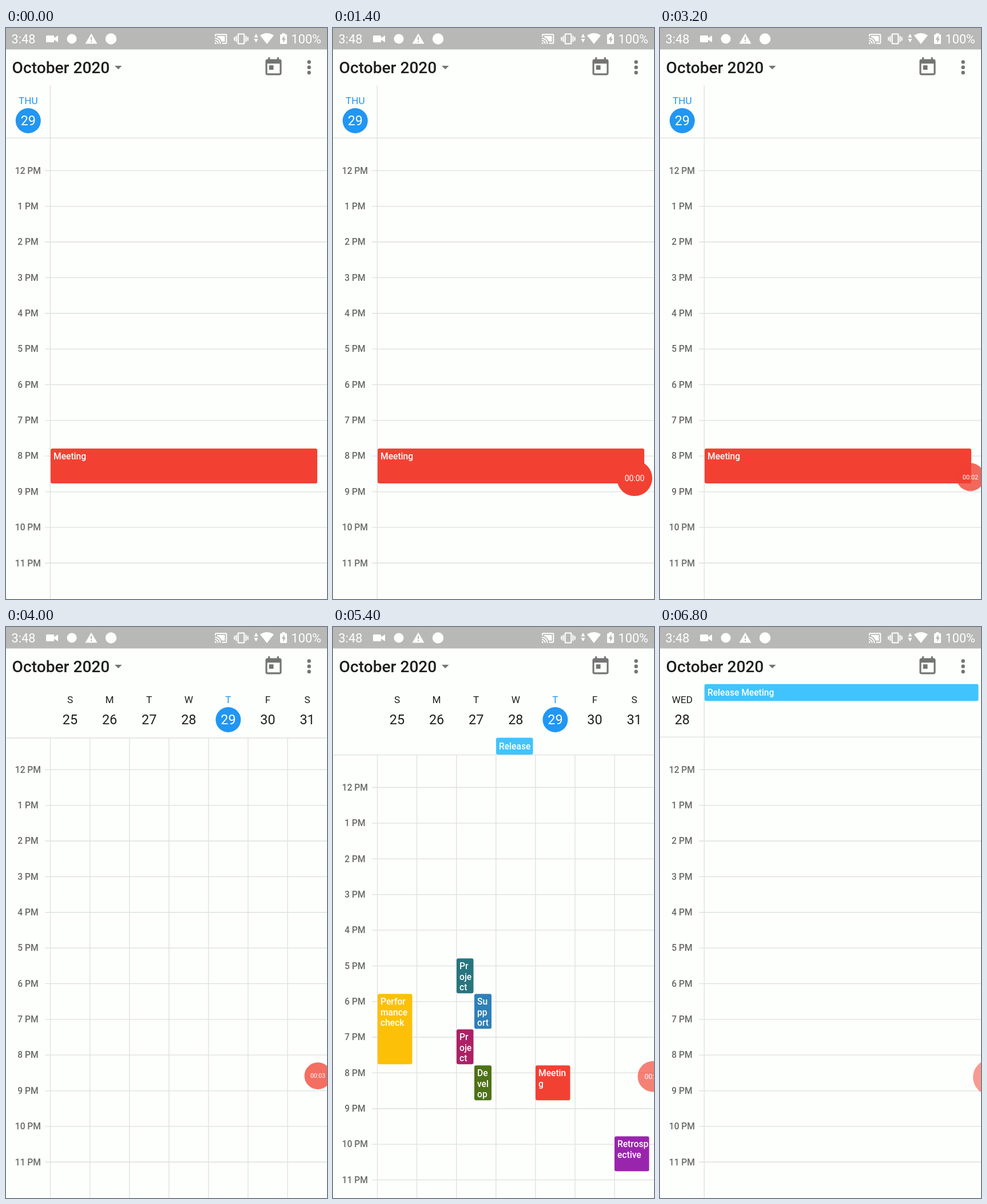
An HTML page that plays this animation: 561x998 px, repeating every 8 s.

```html
<!DOCTYPE html>
<html lang="en">
<head>
<meta charset="utf-8">
<title>Calendar views</title>
<style>
  html, body { margin: 0; width: 100%; height: 100%; overflow: hidden; background: #fdfffc; }
  svg { display: block; width: 100%; height: 100%; font-family: Roboto, Arial, sans-serif; }
  .mid { text-anchor: middle; }
  .hour { font-size: 15.6px; font-weight: 500; fill: #686968; }
  .event { font-size: 15.6px; font-weight: 500; fill: #fff; }
  .name { font-size: 17.2px; }
  .date { font-size: 23.4px; }
  .line { stroke: #dfe0de; stroke-width: 1.3; }
</style>
</head>
<body>
<svg viewBox="0 0 561 998" preserveAspectRatio="none">
  <rect width="561" height="998" fill="#fdfffc"/>

  <g fill="#fff">
    <rect width="561" height="37.5" fill="#b8b9b7"/>
    <g font-size="21.7">
      <text x="9.5" y="27">3:48</text>
      <text x="498.5" y="27">100%</text>
    </g>
    <path id="camera" d="M71.5 13h11q1.5 0 1.5 1.5v3l7-4.5v12l-7-4.5v3q0 1.5-1.5 1.5h-11q-1.5 0-1.5-1.5v-9q0-1.5 1.5-1.5z"/>
    <g id="notices">
      <circle cx="115" cy="19" r="8.5"/>
      <path d="M149 9.5L159.5 27.5H138.5Z"/>
      <path d="M148 15.5h2v5.5h-2zM148 22.8h2v2.2h-2z" fill="#b8b9b7"/>
      <circle cx="183.5" cy="19" r="9.7"/>
    </g>
    <path transform="translate(364 7.3) scale(.97)" d="M1 18v3h3c0-1.66-1.34-3-3-3zm0-4v2c2.76 0 5 2.24 5 5h2c0-3.87-3.13-7-7-7zm18-7H5v1.63c3.96 1.28 7.09 4.41 8.37 8.37H19V7zM1 10v2c4.97 0 9 4.03 9 9h2c0-6.08-4.93-11-11-11zm20-7H3c-1.1 0-2 .9-2 2v3h2V5h18v14h-7v2h7c1.1 0 2-.9 2-2V5c0-1.1-.9-2-2-2z"/>
    <path transform="translate(398.3 6.3) scale(1.06)" d="M0 15h2V9H0v6zm3 2h2V7H3v10zm19-8v6h2V9h-2zm-3 8h2V7h-2v10zM16.5 3h-9C6.67 3 6 3.67 6 4.5v15c0 .83.67 1.5 1.5 1.5h9c.83 0 1.5-.67 1.5-1.5v-15c0-.83-.67-1.5-1.5-1.5zM16 19H8V5h8v14z"/>
    <path d="M437 10l3.5 6.5h-7zM437 25.5l3.5-6.5h-7z"/>
    <path d="M456 28L444 13Q456 5 468 13Z"/>
    <path d="M482.5 11v-2h5v2h2q1.5 0 1.5 1.5v14q0 1.5-1.5 1.5h-9q-1.5 0-1.5-1.5v-14q0-1.5 1.5-1.5z"/>
    <path d="M486.5 13l-5 7.5h3v5.5l4.5-7.5h-2.5z" fill="#b8b9b7"/>
  </g>

  <text x="10.6" y="79" font-size="28.1" font-weight="500" fill="#1d1e1d">October 2020</text>
  <g fill="#737473">
    <path d="M190 66h12.5l-6.25 6.3z"/>
    <path transform="translate(448.8 49.7) scale(1.56)" d="M19 3h-1V1h-2v2H8V1H6v2H5c-1.11 0-1.99.9-1.99 2L3 19c0 1.1.89 2 2 2h14c1.1 0 2-.9 2-2V5c0-1.1-.9-2-2-2zm0 16H5V8h14v11zM7 10h5v5H7z"/>
    <circle cx="529.7" cy="59.4" r="3.2"/>
    <circle cx="529.7" cy="68.7" r="3.2"/>
    <circle cx="529.7" cy="78" r="3.2"/>
  </g>

  <g id="hours"></g>
  <g id="today"></g>
  <g id="week"></g>
  <g id="weekEvents"></g>
  <g id="yesterday"></g>
  <g id="yesterdayEvents"></g>

  <g id="bubble">
    <circle id="disc" r="31" fill="#f24133"/>
    <text id="timer" class="mid" y="4.9" font-size="13.9" fill="#fff"></text>
  </g>
</svg>
<script>
const LOOP = 8000;
const WEEK_AT = 4000, WEEK_LOADED = 4100, DAY_AT = 6100, DAY_LOADED = 6200;
const RECORD_AT = 900;
const BLUE = '#2196f3', INK = '#1f201f', RED = '#f24133', SKY = '#41c4fe';
const COL = 69.1, HOUR = 62.36, NOON = 249.3, SHIFT = 31.2;

const $ = id => document.getElementById(id);
const clamp = v => Math.min(1, Math.max(0, v));
const ramp = (t, from, to) => clamp((t - from) / (to - from));
const ease = p => p * p * (3 - 2 * p);
const mix = (a, b, p) => a + (b - a) * p;
const show = (id, on) => $(id).setAttribute('display', on ? 'inline' : 'none');

const line = (x1, y1, x2, y2) =>
  `<line class="line" x1="${x1}" y1="${y1}" x2="${x2}" y2="${y2}"/>`;
const label = (cls, x, y, text, fill) =>
  `<text class="${cls}" x="${x}" y="${y}"${fill ? ` fill="${fill}"` : ''}>${text}</text>`;

// Events start a little above their hour line; "|" breaks the title.
function event(x, w, hour, hours, color, text) {
  const y = Math.round(NOON + hour * HOUR - 13.5);
  const h = Math.round(hours * HOUR - 1.5);
  const rows = text.split('|').map((s, i) => label('event', x + 5, y + 19 + i * 18.5, s));
  return `<rect x="${x}" y="${y}" width="${w}" height="${h}" rx="3" fill="${color}"/>` + rows.join('');
}

function allDay(x, y, w, text) {
  return `<rect x="${x}" y="${y}" width="${w}" height="29.5" rx="3" fill="${SKY}"/>` +
    label('event', x + 5, y + 20, text);
}

function heading(x, name, date, current) {
  return label('name mid', x, 132.7, name, current ? BLUE : INK) +
    (current ? `<circle cx="${x}" cy="162" r="22" fill="${BLUE}"/>` : '') +
    label('date mid', x, 170.2, date, current ? '#fff' : INK);
}

const dayFrame = line(77.3, 100, 77.3, 998) + line(0, 192.4, 561, 192.4);

function hourRows() {
  let out = '';
  for (let i = 0; i < 12; i++) {
    const y = NOON + i * HOUR;
    out += line(68, y, 561, y) + label('hour mid', 38.4, y + 5.3, (i || 12) + ' PM');
  }
  return out;
}

function weekHeadings() {
  return [...'SMTWTFS'].map((s, i) => heading(112 + i * COL, s, 25 + i, i === 4)).join('');
}

function weekGrid(top) {
  let out = line(0, top, 561, top);
  for (let i = 0; i < 7; i++) {
    const x = 77.5 + i * COL;
    out += line(x, top, x, 998);
  }
  return out;
}

$('hours').innerHTML = hourRows();
$('today').innerHTML = dayFrame + heading(38.8, 'THU', 29, true) +
  event(78, 466, 8, 1, RED, 'Meeting');
$('week').innerHTML = weekHeadings() + '<g id="grid"></g>';
$('weekEvents').innerHTML = allDay(285, 193.5, 64.5, 'Release') +
  `<g transform="translate(0 ${SHIFT})">` +
  event(78, 60.5, 6, 2, '#fcc009', 'Perfor|mance|check') +
  event(216, 29.5, 5, 1, '#27757e', 'Pr|oje|ct') +
  event(247, 30, 6, 1, '#2f80b8', 'Su|pp|ort') +
  event(216, 29.5, 7, 1, '#ae2065', 'Pr|oje|ct') +
  event(247, 30, 8, 1, '#4d7217', 'De|vel|op') +
  event(354, 60.5, 8, 1, RED, 'Meetin|g') +
  event(492, 60.5, 10, 1, '#9a25ad', 'Retrosp|ective') + '</g>';
$('yesterday').innerHTML = dayFrame + heading(38.8, 'WED', 28, false);
$('yesterdayEvents').innerHTML = allDay(78, 99.7, 478.5, 'Release Meeting');

function drawStatus(t) {
  const away = ease(ramp(t, 440, 735)) - ease(ramp(t, 900, 1150));
  $('notices').setAttribute('transform', `translate(${-34 * away} 0)`);
  $('camera').setAttribute('opacity', clamp(1 - away * 2));
}

// The recorder bubble shrinks against the edge, then slides half out of view.
function drawBubble(t) {
  const dock = ramp(t, 2600, 3300), hide = ramp(t, 5100, 5800);
  const move = (a, b, c) => mix(mix(a, b, dock), c, hide);
  const x = move(527, 545, 578.5), y = move(787, 784.5, 787), r = move(31, 23.5, 31.5);
  $('bubble').setAttribute('transform', `translate(${x} ${y}) scale(${r / 31})`);
  $('disc').setAttribute('opacity', move(1, .76, .53));
  $('timer').textContent = '00:0' + Math.max(0, Math.floor((t - RECORD_AT) / 1000));
  show('bubble', t >= RECORD_AT);
}

function draw(t) {
  const week = t >= WEEK_AT && t < DAY_AT;
  const loaded = week && t >= WEEK_LOADED;
  show('today', t < WEEK_AT);
  show('week', week);
  show('weekEvents', loaded);
  show('yesterday', t >= DAY_AT);
  show('yesterdayEvents', t >= DAY_LOADED);
  $('hours').setAttribute('transform', `translate(0 ${loaded ? SHIFT : 0})`);
  if (week) $('grid').innerHTML = weekGrid(loaded ? 223.6 : 194);
  drawStatus(t);
  drawBubble(t);
}

const start = performance.now();
function tick() {
  draw((performance.now() - start) % LOOP);
  requestAnimationFrame(tick);
}
tick();
</script>
</body>
</html>
```
